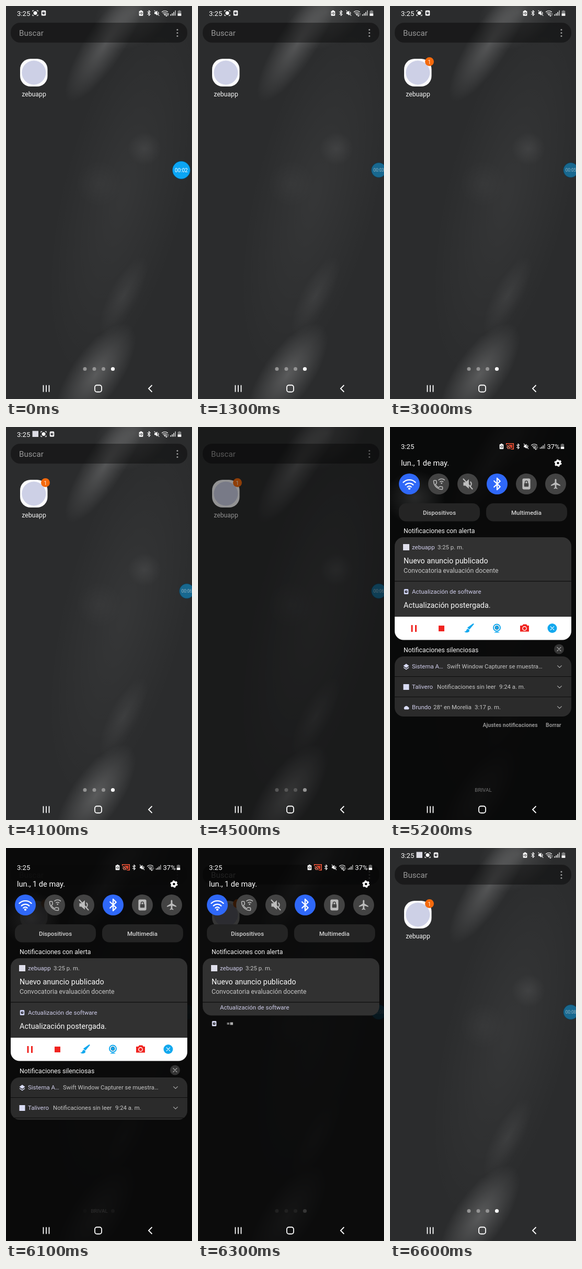
Animation of 356 by 752 pixels, one loop 6.8 s. Source, as an HTML page:

```html
<!DOCTYPE html>
<html lang="es">
<head>
<meta charset="utf-8">
<title>Aviso en el teléfono</title>
<style>
  html, body { margin: 0; width: 100%; height: 100%; overflow: hidden; background: #000; }
  svg { display: block; width: 356px; height: 752px; font-family: Roboto, "Noto Sans", sans-serif; }
  .line { fill: none; stroke: currentColor; stroke-width: 2.2; stroke-linecap: round; stroke-linejoin: round; }
  .solid { fill: currentColor; }
  .white { color: #fff; fill: #fff; }
  .app { fill: #cfcdea; font-size: 11.5px; }
  .info { fill: #c6c6c6; font-size: 11.4px; }
  .head { fill: #f4f4f4; font-size: 12.3px; }
  .title { fill: #fafafa; font-size: 14.4px; }
  .mid { text-anchor: middle; }
</style>
</head>
<body>
<svg viewBox="0 0 356 752">
  <defs>
    <radialGradient id="glow">
      <stop offset="0" stop-color="#fff"/>
      <stop offset=".45" stop-color="#fff" stop-opacity=".55"/>
      <stop offset="1" stop-color="#fff" stop-opacity="0"/>
    </radialGradient>
    <clipPath id="reveal"><rect id="window" x="9" y="184" width="338" height="420" rx="17"/></clipPath>
    <clipPath id="alerts"><rect x="9" y="211" width="338" height="196.500" rx="17"/></clipPath>

    <!-- Icons are centred on a 24 unit grid -->
    <g id="wifi">
      <path class="line" d="M-11-3A15.500 15.500 0 0 1 11-3M-7 1.500A10 10 0 0 1 7 1.500M-3.500 5.500A5 5 0 0 1 3.500 5.500"/>
      <circle class="solid" cy="8.500" r="2"/>
    </g>
    <path id="bt" class="line" d="M-5.500-5.500 5.500 5 0 10.500V-10.500L5.500-5-5.500 5.500"/>
    <g id="mute">
      <path class="solid" d="M-9-3.500H-5L2-9.500V9.500L-5 3.500H-9Z"/>
      <path class="line" d="M5.500-4A6 6 0 0 1 5.500 4M-9-10 9 10"/>
    </g>
    <g id="call">
      <path class="line" style="stroke-width:1.600" transform="translate(-13 -10)" d="M6.600 10.800c1.400 2.800 3.800 5.100 6.600 6.600l2.200-2.200c.3-.3.700-.4 1-.2 1.100.4 2.300.6 3.600.6.600 0 1 .4 1 1V20c0 .6-.4 1-1 1C10.600 21 3 13.400 3 4c0-.6.400-1 1-1h3.500c.6 0 1 .4 1 1 0 1.200.2 2.400.6 3.600.1.300 0 .7-.3 1z"/>
      <path class="line" style="stroke-width:1.600" d="M0-8A9 9 0 0 1 12-8M3-4.500A5 5 0 0 1 9-4.500"/>
      <circle class="solid" cx="6" cy="-1.500" r="1.400"/>
    </g>
    <g id="lock">
      <rect class="solid" x="-8" y="-11" width="16" height="22" rx="3"/>
      <rect x="-4.500" y="-1.500" width="9" height="7" rx="1" fill="#444"/>
      <path d="M-2.500-1V-3.500A2.500 2.500 0 0 1 2.500-3.500V-1" fill="none" stroke="#444" stroke-width="1.600"/>
    </g>
    <path id="plane" class="solid" transform="translate(-11.500 -12)" d="M21 16v-2l-8-5V3.500a1.500 1.500 0 0 0-3 0V9l-8 5v2l8-2.500V19l-2 1.500V22l3.500-1 3.500 1v-1.500L13 19v-5.500z"/>
    <g id="gear" fill="none" stroke="#fff">
      <circle r="7" stroke-width="6"/>
      <circle r="10.500" stroke-width="3.500" stroke-dasharray="5.500 5.500"/>
    </g>
    <g id="saver">
      <path class="solid" d="M-3-11H3V-8.500H6A2 2 0 0 1 8-6.500V9A2 2 0 0 1 6 11H-6A2 2 0 0 1-8 9V-6.500A2 2 0 0 1-6-8.500H-3Z"/>
      <circle cy="1.500" r="3.800" fill="none" stroke="#222" stroke-width="2.400" stroke-dasharray="6 2"/>
    </g>
    <g id="bars">
      <path class="solid" d="M-10 5h3v5h-3zM-4 1h3v9h-3zM2-4h3v14H2z"/>
      <path class="solid" opacity=".75" d="M8-10h3v20H8z"/>
    </g>
    <g id="cell">
      <path class="solid" opacity=".4" d="M-3-11H3V-9H7V11H-7V-9H-3Z"/>
      <path class="solid" d="M-7 2H7V11H-7Z"/>
    </g>
    <g id="cast">
      <path d="M-13-6V-10H13V10H4" fill="none" stroke="#ff5b3c" stroke-width="3"/>
      <path d="M-12-2A12 12 0 0 1 0 10M-12 4A6 6 0 0 1-6 10" fill="none" stroke="#ff8a70" stroke-width="2.800"/>
      <path d="M-6-6H9V6H3A14 14 0 0 0-6-4Z" fill="#d9432b"/>
    </g>
    <g id="rec">
      <path class="line" d="M-10-6V-10H-6M6-10H10V-6M10 6V10H6M-6 10H-10V6"/>
      <circle class="solid" r="7"/>
    </g>
    <g id="clock">
      <rect class="solid" x="-8.500" y="-10" width="17" height="20" rx="3"/>
      <circle r="5" fill="#26262c"/>
      <path class="line" style="stroke-width:1.600" d="M0-3V0H2.500"/>
    </g>
    <path id="chevron" class="line" d="M-7-3.500 0 3.500 7-3.500"/>
    <path id="cross" class="line" d="M-6-6 6 6M6-6-6 6"/>
  </defs>

  <g id="wall"><rect width="356" height="752" fill="#2b2c2d"/></g>

  <g id="items">
    <rect x="9" y="32" width="338" height="38" rx="18" fill="#000" fill-opacity=".4"/>
    <text x="25" y="57" font-size="15.100" fill="#999">Buscar</text>
    <g fill="#9c9c9c"><circle cx="328" cy="45.500" r="1.500"/><circle cx="328" cy="51.500" r="1.500"/><circle cx="328" cy="57.500" r="1.500"/></g>
    <rect x="27" y="101" width="52.500" height="53" rx="20" fill="#fbfbfd"/>
    <circle cx="53.300" cy="127.500" r="23" fill="#cdd0e6"/>
    <text class="mid" x="53.500" y="173" font-size="12.300" fill="#f5f5f5">zebuapp</text>
    <g id="badge">
      <circle cx="75.500" cy="106.500" r="8.500" fill="#f4690c"/>
      <text class="mid" x="75.300" y="110.500" font-size="11" fill="#ffe9da">1</text>
    </g>
    <g fill="#949494"><circle cx="151" cy="694.500" r="3.500"/><circle cx="169" cy="694.500" r="3.500"/><circle cx="186.500" cy="694.500" r="3.500"/></g>
    <circle cx="204.500" cy="694.500" r="3.600" fill="#fff"/>
    <g id="bubble">
      <circle r="18" fill="#16394b"/>
      <circle id="disc" r="16.700" fill="#0ba5f4"/>
      <text id="timer" class="mid" y="3.600" font-size="10" fill="#fff"></text>
    </g>
  </g>

  <rect id="scrim" width="356" height="752" fill="#040404"/>
  <ellipse id="haze" cx="48" cy="135" rx="58" ry="52" fill="url(#glow)"/>

  <g id="status" class="white">
    <text x="21" y="18.500" font-size="13.100">3:25</text>
    <rect id="alert" x="50.500" y="7.500" width="11.500" height="11.500" fill="#dcdce4"/>
    <g id="older"></g>
    <g id="statusRight"></g>
  </g>

  <g id="quick">
    <text class="white" x="21" y="42" font-size="13.100">3:25</text>
    <text class="white" x="300.500" y="42" font-size="13.100">37%</text>
    <text class="white" x="21" y="74" font-size="14.600">lun., 1 de may.</text>
    <g id="toggles"></g>
    <g fill="#242424"><rect x="17" y="146" width="155" height="34.500" rx="14"/><rect x="184" y="146" width="155" height="34.500" rx="14"/></g>
    <g class="mid" font-size="11.500" font-weight="500" fill="#d2d2d2">
      <text x="94.500" y="168">Dispositivos</text><text x="261" y="168">Multimedia</text>
    </g>
  </g>

  <g id="list">
    <g clip-path="url(#reveal)">
      <text class="head" x="26" y="203">Notificaciones con alerta</text>
      <g clip-path="url(#alerts)">
        <rect x="9" y="211" width="338" height="153" fill="#313131"/>
        <rect x="25" y="224" width="12" height="12" fill="#dedeea"/>
        <text class="app" x="42" y="234">zebuapp</text>
        <text class="info" x="91" y="234">3:25 p. m.</text>
        <text class="title" x="26" y="261">Nuevo anuncio publicado</text>
        <text class="info" x="26" y="279" style="font-size:12.300px">Convocatoria evaluación docente</text>
        <rect x="9" y="294.500" width="338" height="1.200" fill="#0c0c0c"/>
        <g id="update">
          <g id="updateIcon" color="#cfd3f4"><use href="#clock" transform="translate(31 315) scale(.5)"/></g>
          <text class="app" x="42" y="319">Actualización de software</text>
          <text class="title" x="26" y="346">Actualización postergada.</text>
        </g>
        <rect x="9" y="363" width="338" height="45" fill="#fff"/>
        <g fill="#f0231f">
          <rect x="40.500" y="379" width="3" height="13"/><rect x="48" y="379" width="3" height="13"/>
          <rect x="93" y="380" width="11" height="11"/>
          <path d="M249 380h4l2-2.500h6l2 2.500h3v11.500h-17z"/>
        </g>
        <circle cx="257.500" cy="385.500" r="3.700" fill="#f0231f" stroke="#fff" stroke-width="1.400"/>
        <path d="M160 376.500 152 386 149.500 384Z" stroke="#12a8ee" stroke-width="2" fill="#12a8ee"/>
        <path d="M142 391.500q4 0 4.500-3.500 2-3.500 5 0 2 4-3 5-4 1-6.500-1.500z" fill="#12a8ee"/>
        <circle cx="204.500" cy="384" r="6.500" fill="none" stroke="#12a8ee" stroke-width="2"/>
        <circle cx="204.500" cy="384" r="3.500" fill="#12a8ee" stroke="#176f9f"/>
        <path d="M199 393.500q5.500-4 11 0z" fill="#12a8ee"/>
        <circle cx="310.500" cy="385" r="9" fill="#12a8ee"/>
        <use href="#cross" color="#fff" transform="translate(310.500 385) scale(.53)"/>
      </g>
      <text class="head" x="26" y="431">Notificaciones silenciosas</text>
      <circle cx="323.500" cy="425" r="9.500" fill="#343434"/>
      <use href="#cross" color="#aaa" transform="translate(323.500 425) scale(.6)"/>
      <rect x="9" y="439" width="338" height="115" rx="17" fill="#2b2b2b"/>
      <path d="M9 477.500H347M9 516.500H347" stroke="#0c0c0c" stroke-width="1.200"/>
      <g fill="#d9dcf5">
        <path d="M31 453 36.500 457 31 461 25.500 457ZM26.500 459.500 31 462.800 35.500 459.500 36.500 460.500 31 464.500 25.500 460.500Z"/>
        <rect x="25.500" y="492" width="11" height="11"/>
        <path d="M28 540.500a3 3 0 0 1 0-5 4 4 0 0 1 7 .5 2.400 2.400 0 0 1 0 4.500z"/>
      </g>
      <g id="rows"></g>
      <g font-size="10.500" font-weight="700" fill="#8f8f8f">
        <text x="177.500" y="573.500">Ajustes notificaciones</text><text x="298" y="573.500">Borrar</text>
      </g>
    </g>
    <g id="shelf" color="#d5d7ee">
      <use href="#clock" transform="translate(31 0) scale(.5)"/>
      <rect x="55.500" y="-2" width="4.500" height="4" fill="#777"/><rect x="61.500" y="-2.500" width="5.500" height="5" fill="#aaa"/>
    </g>
  </g>
  <text id="carrier" class="mid" x="178.500" y="698" font-size="9.800" fill="#757575">BRIVAL</text>

  <g fill="none" stroke="#fff" stroke-width="1.800">
    <path d="M71.500 725.500V738.500M77 725.500V738.500M82.500 725.500V738.500"/>
    <rect x="170" y="725.500" width="13" height="13" rx="4"/>
    <path d="M279.500 725.500 273 732 279.500 738.500"/>
  </g>
</svg>

<script>
const $ = id => document.getElementById(id);
const add = (id, html) => $(id).insertAdjacentHTML('beforeend', html);
const icon = (name, x, y, size) =>
  `<use href="#${name}" transform="translate(${x} ${y}) scale(${size})"/>`;

// x, y, rx, ry, angle, strength
const glows = [
  [190, 72, 130, 38, -57, .2], [245, 12, 85, 62, -40, .13],
  [225, 360, 120, 360, 14, .05], [265, 273, 32, 32, 0, .07],
  [178, 340, 45, 45, 0, .03], [225, 555, 85, 28, -62, .07],
  [172, 705, 115, 48, -55, .22]
];
add('wall', glows.map(([x, y, rx, ry, angle, strength]) =>
  `<ellipse rx="${rx}" ry="${ry}" fill="url(#glow)" opacity="${strength}" transform="translate(${x} ${y}) rotate(${angle})"/>`).join(''));

const radio = (x, y) => icon('wifi', x, y, .5) +
  `<path d="M${x + 3} ${y + 2}v5M${x + 1.5} ${y + 5}l1.5 2 1.5-2" stroke="#fff" fill="none"/>` +
  `<path class="up" d="M${x + 6} ${y + 6}v-5M${x + 4.5} ${y + 3}l1.5-2 1.5 2" stroke="#fff" fill="none"/>`;

add('older', icon('rec', 56, 13.500, .5) + icon('clock', 72, 13.500, .5));
add('statusRight', icon('saver', 258.500, 13.500, .48) + icon('bt', 273.500, 13.500, .48) +
  icon('mute', 288.500, 13.500, .5) + radio(304, 13) + icon('bars', 319.500, 13.500, .5) + icon('cell', 332, 13.500, .48));
add('quick', '<g class="white">' + icon('saver', 213.500, 37, .48) + icon('cast', 229.500, 37, .52) +
  icon('bt', 245, 37, .46) + icon('mute', 260.500, 37, .48) + radio(276, 36.500) +
  icon('bars', 291.500, 37, .46) + icon('cell', 330, 37, .46) + icon('gear', 321.500, 69, .58) + '</g>');

['wifi', 'call', 'mute', 'bt', 'lock', 'plane'].forEach((name, i) => {
  const on = name === 'wifi' || name === 'bt';
  const x = 37 + i * 56;
  add('toggles', `<g color="${on ? '#fff' : '#bdbdbd'}"><circle cx="${x}" cy="109" r="20" fill="${on ? '#2f68f8' : '#434343'}"/>` +
    icon(name, x, 109, on ? 1.05 : .95) + '</g>');
});

const rows = [
  ['Sistema A…', 109, 'Swift Window Capturer se muestra…'],
  ['Talivero', 90, 'Notificaciones sin leer', 209, '9:24 a. m.'],
  ['Brundo', 83, '28° en Morelia', 162, '3:17 p. m.']
];
rows.forEach(([app, x, info, x2, hour = ''], i) => {
  const y = 462 + i * 39;
  add('rows', `<text class="app" x="42" y="${y}">${app}</text><text class="info" x="${x}" y="${y}">${info}</text>` +
    (hour && `<text class="info" x="${x2}" y="${y}">${hour}</text>`) +
    `<g color="#aaa">${icon('chevron', 324.500, y - 3.500, .55)}</g>`);
});

// time, scrim, home items, quick panel, list bottom, carrier
const poses = [
  [0, 0, 1, 0, 184, 0],
  [4400, .2, 1, 0, 184, 0], [4500, .42, 1, 0, 184, 0],
  [4600, .6, .8, .3, 210, 0], [4700, .72, .6, .7, 305, 0],
  [4800, .8, .4, 1, 407, 0], [4900, .83, .25, 1, 490, 0],
  [5000, .85, .1, 1, 604, .4], [5100, .85, .05, 1, 604, .8], [5200, .85, 0, 1, 604, 1],
  [6100, .84, .3, 1, 520, .3], [6200, .82, .6, 1, 420, 0], [6300, .8, 1, 1, 320.500, 0],
  [6400, .62, 1, .5, 230, 0], [6500, .3, 1, 0, 184, 0], [6600, 0, 1, 0, 184, 0]
];
const ticks = [1100, 2100, 3000, 4100, 5100, 6100];
const LOOP = 6800, STEP = 100;

const set = (id, attrs) => { for (const k in attrs) $(id).setAttribute(k, attrs[k]); };
const clamp = v => Math.max(0, Math.min(1, v));
const mix = (a, b, p) => a + (b - a) * p;
const blend = (a, b, p) => `rgb(${a.map((v, i) => Math.round(mix(v, b[i], p)))})`;

function drawBubble(t) {
  const p = clamp((t - 1100) / 200);
  set('bubble', { transform: `translate(${mix(335.500, 346, p)} 314) scale(${mix(1, .82, p)})` });
  set('disc', { fill: blend([11, 165, 244], [24, 104, 143], p) });
  set('timer', { fill: blend([255, 255, 255], [150, 180, 195], p) });
  $('timer').textContent = '00:0' + (2 + ticks.filter(k => t >= k).length);
}

function drawStatus(t, scrim) {
  const p = clamp((t - 3200) / 300);
  set('status', { opacity: clamp(1 - scrim * 2.5) });
  set('alert', { opacity: p });
  set('older', { transform: `translate(${16 * p} 0)` });
  const lit = t < 400 || (t >= 3300 && t < 3500);
  document.querySelectorAll('.up').forEach(el => el.setAttribute('opacity', lit ? 1 : .45));
}

function drawShade([, scrim, items, quick, bottom, carrier]) {
  set('scrim', { opacity: scrim });
  set('items', { opacity: items });
  set('haze', { opacity: .13 * (1 - items) });
  set('quick', { opacity: quick, transform: `translate(0 ${-16 * (1 - quick)})` });
  set('list', { opacity: quick });
  set('window', { height: bottom - 184 });
  set('update', { transform: `translate(0 ${-10 * clamp((407 - bottom) / 86.500)})` });
  set('updateIcon', { opacity: bottom < 345 ? 0 : 1 });
  set('shelf', { opacity: bottom < 430 && bottom > 240 ? 1 : 0, transform: `translate(0 ${bottom + 15.500})` });
  set('carrier', { opacity: carrier });
}

function draw(now) {
  const t = Math.floor((now % LOOP) / STEP) * STEP;
  const pose = poses.filter(p => p[0] <= t).pop();
  drawShade(pose);
  drawStatus(t, pose[1]);
  drawBubble(t);
  set('badge', { opacity: t >= 3000 ? 1 : 0 });
}

const start = performance.now();
function frame() {
  draw(performance.now() - start);
  requestAnimationFrame(frame);
}
frame();
</script>
</body>
</html>
```
